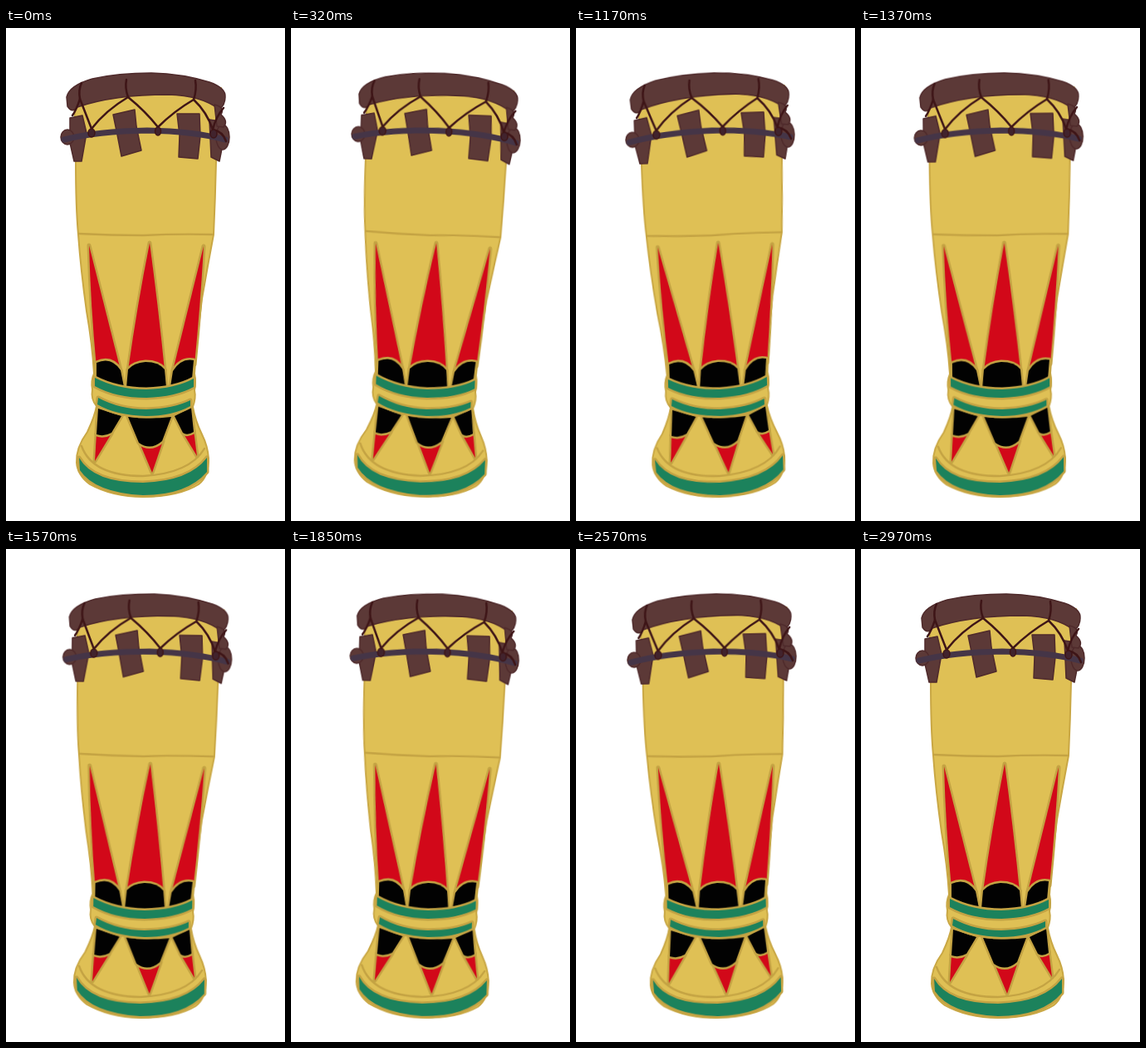
An HTML page that plays this animation: 336 px wide and 592 px high, repeating every 3.01 s.

```html
<!DOCTYPE html>
<html lang="en">
<head>
<meta charset="utf-8">
<title>Swaying drum</title>
<style>
  html, body { margin: 0; width: 100%; height: 100%; overflow: hidden; background: #fff; }
  svg { display: block; width: 336px; height: 592px; }
  #drum { transform-origin: 168px 309px; animation: sway 3010ms infinite; }

  /* The sway runs at 25 poses a second, with a pause at the first right lean. */
  @keyframes sway {
    0%       { transform: rotate(0deg);     animation-timing-function: steps(8, end); }
    10.6312% { transform: rotate(2.25deg);  animation-timing-function: step-end; }
    18.9369% { transform: rotate(2.25deg);  animation-timing-function: steps(15, end); }
    38.8704% { transform: rotate(-1.95deg); animation-timing-function: steps(15, end); }
    58.8040% { transform: rotate(2.25deg);  animation-timing-function: steps(15, end); }
    78.7375% { transform: rotate(-1.95deg); animation-timing-function: steps(15, end); }
    98.6711%, 100% { transform: rotate(0deg); animation-timing-function: step-end; }
  }

  .body  { fill: #dfc055; stroke: #c9a744; stroke-width: 2; }
  .line  { fill: none; stroke: #c4a343; stroke-width: 2.4; }
  .red   { fill: #d20819; }
  .black { fill: #020202; }
  .green { fill: #1c825c; }
  .trim  { stroke: #c4a343; stroke-width: 5; paint-order: stroke; }
  .wood  { fill: #5c3937; stroke: #4f2a2b; stroke-width: 1.5; }
  .ring  { fill: none; stroke: #453547; stroke-width: 7; }
  .cord  { fill: none; stroke: #3e1517; stroke-width: 2.5; }
  .knot  { fill: #41232d; stroke: #3e1517; stroke-width: 1.5; }
  g { stroke-linejoin: round; stroke-linecap: round; }
</style>
</head>
<body>
<svg viewBox="0 0 336 592">
  <g id="drum">
    <path class="body" d="M82 72 L84 160 Q84 215 87 248 Q90 290 97 340 Q104 380 106 415
      Q102 424 104 434 Q102 446 109 454 Q107 466 98 485 Q84 504 85 522 Q86 537 101 548
      Q128 563 165 563 Q208 563 232 548 Q244 539 244 517 Q243 502 236 488
      Q228 472 225 455 Q229 444 227 435 Q229 425 227 415 Q230 372 236 325
      Q243 285 250 248 Q252 205 253 160 L259 72 Z"/>
    <path class="line" d="M88 247 Q126 249 165 249 Q207 247 249 248"/>

    <g class="trim">
      <path class="red" d="M100 261 L138 411 L109 408 Q102 335 100 261 Z"/>
      <path class="red" d="M173 258 Q184 340 191 411 L147 411 Q158 333 173 258 Z"/>
      <path class="red" d="M238 262 Q234 335 227 404 L201 411 Z"/>
      <path class="black" d="M109 402 Q127 394 138 411 L142 431 L109 421 Z"/>
      <path class="black" d="M145 432 L147 410 Q154 402 168 401 Q184 401 191 410 L193 432 Q168 435 145 432 Z"/>
      <path class="black" d="M198 431 L201 412 Q211 396 226 399 L224 421 Z"/>
    </g>

    <g class="trim">
      <path class="red" d="M109 487 L127 487 L107 520 Z"/>
      <path class="red" d="M160 496 L189 496 L176 534 Z"/>
      <path class="red" d="M213 486 L226 483 L230 514 Z"/>
      <path class="black" d="M111 457 L139 466 L127 486 Q118 491 109 488 Z"/>
      <path class="black" d="M147 467 Q173 470 199 467 L188 496 Q174 508 160 498 Z"/>
      <path class="black" d="M203 466 L223 456 L226 485 Q218 490 213 486 Z"/>
    </g>

    <g class="trim">
      <path class="green" d="M107 420 Q134 434 169 434 Q204 433 226 421 L226 431 Q204 443 169 444 Q132 444 107 430 Z"/>
      <path class="green" d="M111 444 Q137 458 169 458 Q202 457 222 447 L222 454 Q200 466 169 466 Q132 465 110 452 Z"/>
      <path class="green" d="M88 516 Q105 546 165 546 Q221 544 242 516 L242 533 Q218 561 165 561 Q107 558 89 531 Z"/>
    </g>
    <path class="line" d="M91 502 Q104 538 165 538 Q221 535 239 505"/>

    <g class="wood">
      <path d="M77 108 L92 105 L97 126 L91 160 L82 160 L77 138 Z"/>
      <path d="M129 104 L155 98 L157 118 L163 147 L139 154 L134 128 Z"/>
      <path d="M206 103 L233 103 L234 130 L231 157 L208 155 L209 129 Z"/>
      <path d="M245 110 L258 112 L262 135 L257 160 L247 155 Z"/>
      <ellipse cx="74" cy="131" rx="8" ry="9"/>
      <ellipse cx="261" cy="131" rx="8" ry="15"/>
      <path d="M73 83 Q76 69 104 61 Q135 54 175 54 Q213 55 245 65 Q265 72 264 83
        Q264 92 257 98 Q236 81 195 80 Q130 80 86 95 Q80 103 74 94 Z"/>
      <path d="M251 92 Q264 95 259 104 Q268 112 262 119 L254 118 Z"/>
    </g>

    <path class="ring" d="M70 134 Q110 124 170 123 Q226 124 264 134"/>
    <g class="cord">
      <path d="M91 66 Q87 74 89 85 Q85 98 80 105"/>
      <path d="M89 85 L103 121 Q120 99 147 83 Q143 72 145 62"/>
      <path d="M147 83 Q168 100 183 119 Q202 100 226 86 Q230 74 228 63"/>
      <path d="M226 86 Q242 101 249 122 Q253 106 262 96"/>
      <path d="M249 122 Q261 124 265 136"/>
    </g>
    <g class="knot">
      <ellipse cx="103" cy="126" rx="4" ry="5"/>
      <ellipse cx="183" cy="124" rx="3.5" ry="5"/>
      <ellipse cx="250" cy="127" rx="4" ry="5"/>
    </g>
  </g>
</svg>
</body>
</html>
```
